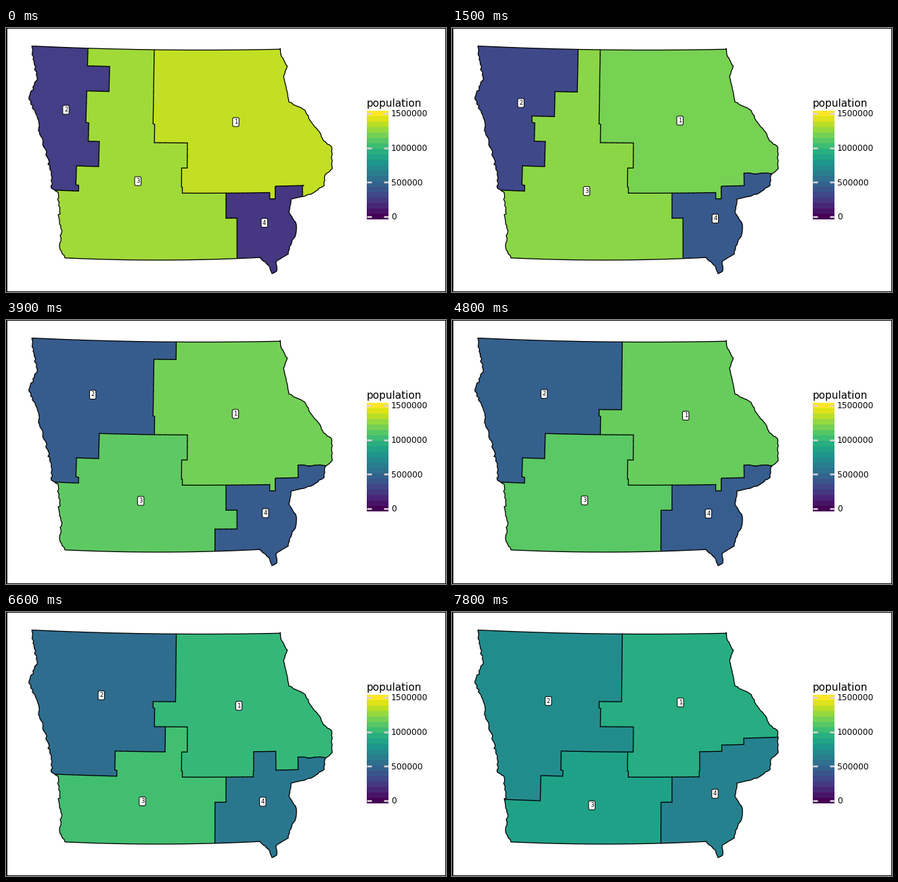
Animation, 650 px wide and 389 px high, one loop 8000 ms. Source, as a matplotlib script:

```python
import math
import random

import matplotlib.pyplot as plt
import numpy as np
from matplotlib.animation import FuncAnimation
from matplotlib.collections import LineCollection
from matplotlib.patches import PathPatch, Rectangle
from matplotlib.path import Path

W, H, DPI = 650, 389, 100
PX = 72 / DPI
TICK_MS, TICKS_PER_STEP, TICKS = 100, 3, 80
MAX_POP = 1500  # thousands
rng = random.Random(4)


# The land is surveyed in square townships: column c, row v.
# Columns lean together southwards and are reset at each correction row.
CORRECTIONS = (12, 22)


def row_y(x, v):
    return 169.4 + 9.25 * (v - 15) - 9.4e-5 * (x - 290) ** 2


def column_x(c, v):
    band = sum(v > k for k in CORRECTIONS)
    start = np.array((0, *CORRECTIONS))[band]
    return 219 + 8.15 * c + (c - 14) * (.0102 * (v - start) - .045 * band)


cols = np.arange(-25, 35)
rows = np.sort(np.append(np.arange(38.), [k + .1 for k in CORRECTIONS]))
C, V = np.meshgrid(cols, rows)
X = column_x(C, V)
Y = row_y(X, V)
creek = (V == 20) & (C > 26)
Y[creek] += 1.2 + 1.2 * np.sin(2.5 * C[creek])
mid_c, mid_v = C[:-1, :-1] + .5, (V[:-1, :-1] + V[1:, :-1]) / 2


def river(points, jitter):
    """Join key points by a bank that wavers every few pixels."""
    out = []
    for (x0, y0), (x1, y1) in zip(points, points[1:]):
        n = math.ceil(math.hypot(x1 - x0, y1 - y0) / 4)
        for k in range(n):
            j = jitter if k else 0
            out.append((x0 + (x1 - x0) * k / n + rng.uniform(-j, j),
                        y0 + (y1 - y0) * k / n + rng.uniform(-j, j)))
    return out + [points[-1]]


north = [(x, row_y(x, .2)) for x in np.linspace(38, 405, 20)]
east = river([
    (405, 30.5), (407, 42), (415.5, 56), (410, 71), (418, 109), (442, 121.5),
    (449, 136), (463, 153), (469, 166), (481, 175), (482, 207), (471, 217),
    (470, 232), (450, 245), (421, 252), (418, 271), (429, 290), (428, 304),
    (419, 322), (417, 333), (399, 344), (400, 358), (393, 362), (388, 350),
    (375, 338)], .7)
south = [(x, 342 - 1.7e-4 * (x - 225) ** 2) for x in np.linspace(375, 87, 16)]
west = river([
    (87, 338), (79, 322), (82, 303), (79, 284), (78, 262), (77, 242),
    (67, 236), (67, 214), (58, 178), (50, 157), (48, 136), (34, 105),
    (46, 72), (40, 46), (38, 26.5)], 1.6)
outline = Path(north + east + south + west)


def block(c, v, width=4, height=4):
    return ((mid_c > c) & (mid_c < c + width) &
            (mid_v > v) & (mid_v < v + height))


# Starting districts, painted over one another.
owner = np.full(mid_c.shape, 3)
for district, *area in [
        (1, 0, 0, 40, 15), (1, 6, 15, 40, 4), (1, 5, 19, 40, 4),
        (4, 13, 23, 40, 4), (4, 15, 27, 40, 20), (4, 22, 22, 5, 1),
        (1, 21, 23, 1, 1), (1, 27, 22, 20, 3),
        (2, -30, 0, 18, 15), (2, -12, 3), (2, -30, 15, 20), (2, -30, 19, 16)]:
    owner[block(*area)] = district
RURAL = 12
people = np.array([0, 1365, 275, 1287, 238])
states = [(owner, people)]


def give(district, *areas, pop=RURAL):
    """Hand one county to a district; each call is one step."""
    land, count = (a.copy() for a in states[-1])
    county = np.any([block(*a) for a in areas], axis=0)
    count[land[county][0]] -= pop
    count[district] += pop
    land[county] = district
    states.append((land, count))


give(4, (26, 20, 9, 2), (27, 22, 8, 3), pop=175)
give(2, (-12, 0, 4, 3))
give(2, (-12, 7))
give(2, (-8, 0, 4, 3))
give(2, (-8, 3))

give(2, (-8, 7))
give(2, (-12, 11))
give(2, (-8, 11))
give(2, (-4, 0, 4, 7))
give(2, (-4, 7, 4, 3))

give(2, (-4, 10, 4, 5), pop=37)
give(2, (0, 0, 4, 3))
give(4, (11, 30, 4, 9))
give(2, (0, 3))
give(4, (11, 27, 4, 3))
give(2, (0, 7))

give(4, (18, 19), (21, 23, 1, 1), pop=153)
give(2, (-10, 15))
give(2, (-6, 15))

give(2, (-10, 19, 3), (-11, 22, 4, 1))
give(2, (-14, 19))
give(2, (-2, 15), pop=27)
give(2, (-30, 23, 19), pop=94)

give(4, (22, 18), pop=19)
give(4, (26, 17, 9, 3), pop=46)
give(2, (2, 15), pop=98)


mid_x = (X[:-1, :-1] + X[1:, 1:]) / 2
mid_y = (Y[:-1, :-1] + Y[1:, 1:]) / 2
inside = outline.contains_points(np.c_[mid_x.ravel(), mid_y.ravel()])
weight = inside.reshape(mid_x.shape) * np.diff(rows)[:, None]
corners = np.dstack([X, Y])


def borders_of(land):
    """Township sides that separate two districts."""
    i, j = np.nonzero(land[1:] != land[:-1])
    level = np.stack([corners[i + 1, j], corners[i + 1, j + 1]], axis=1)
    i, j = np.nonzero(land[:, 1:] != land[:, :-1])
    upright = np.stack([corners[i, j + 1], corners[i + 1, j + 1]], axis=1)
    return np.concatenate([level, upright])


plt.rcParams["font.family"] = "DejaVu Sans"
fig = plt.figure(figsize=(W / DPI, H / DPI), dpi=DPI, facecolor="white")
ax = fig.add_axes([0, 0, 1, 1])

mesh = ax.pcolormesh(X, Y, owner, cmap="viridis", vmin=0, vmax=MAX_POP)
borders = ax.add_collection(LineCollection([], colors="black", capstyle="round",
                                           linewidths=1.3 * PX))
for artist in (mesh, borders):
    artist.set_clip_path(outline, ax.transData)
ax.add_patch(PathPatch(outline, fc="none", ec="black", lw=1.3 * PX, joinstyle="round"))
labels = {d: ax.text(0, 0, str(d), size=6, ha="center", va="center",
                     bbox=dict(boxstyle="round,pad=0.25", fc="white", ec="black",
                               lw=PX))
          for d in (1, 2, 3, 4)}

ax.set(xlim=(0, W), ylim=(H, 0))
ax.axis("off")
for x, y, w, h in [(0, 0, 1.6, H), (0, 0, W, 1), (W - 1, 0, 1, H), (0, H - 1, W, 1)]:
    ax.add_patch(Rectangle((x, y), w, h, color="black", lw=0))

# Legend
BAR_X, BAR_Y, BAR_W, BAND, BANDS = 532.5, 122, 32.5, 8, 20
ax.text(BAR_X, 116, "population", size=11)
for k in range(BANDS):
    ax.add_patch(Rectangle((BAR_X, BAR_Y + k * BAND), BAR_W, BAND, lw=0,
                           color=mesh.cmap(1 - k / (BANDS - 1)), antialiased=False))
for value in range(0, MAX_POP + 1, 500):
    y = BAR_Y + BAND * (.5 + (BANDS - 1) * (1 - value / MAX_POP))
    for x in (BAR_X, BAR_X + BAR_W - 7.5):
        ax.plot([x, x + 7.5], [y, y], color="#d9d3d9", lw=2.6 * PX,
                solid_capstyle="butt")
    ax.text(569, y + 4.4, str(value * 1000), size=8.8)


def draw(tick):
    land, count = states[min(tick // TICKS_PER_STEP, len(states) - 1)]
    mesh.set_array(count[land])
    borders.set_segments(borders_of(land))
    for d, label in labels.items():
        share = weight * (land == d)
        label.set_position(((share * mid_x).sum() / share.sum(),
                            (share * mid_y).sum() / share.sum()))
    return [mesh, borders, *labels.values()]


anim = FuncAnimation(fig, draw, frames=TICKS, interval=TICK_MS, repeat=True,
                     repeat_delay=0, blit=False)
plt.show()
```
